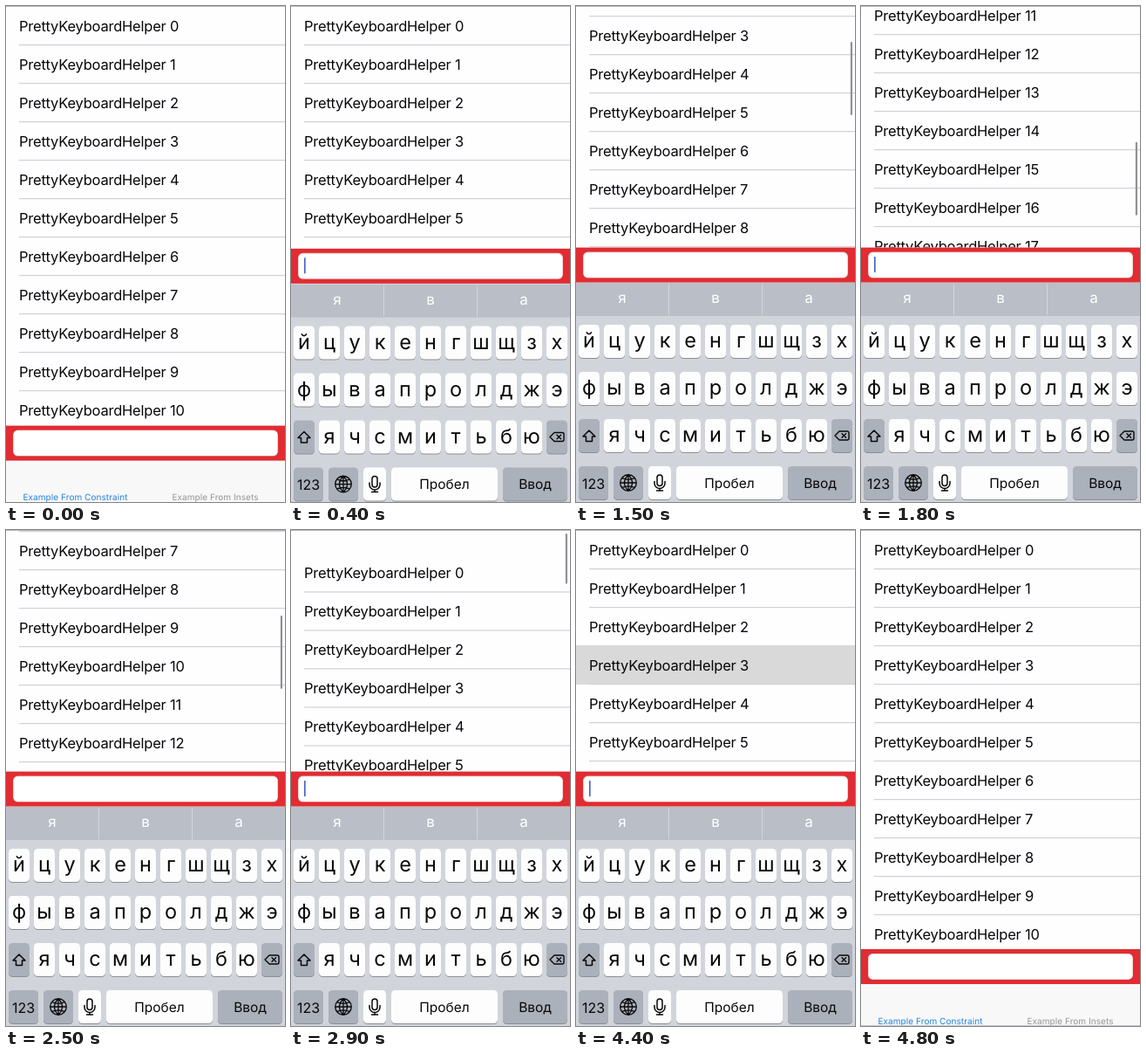
Animation, 320 px wide and 568 px high, one loop 4.9 s. Source, as an HTML page with a canvas:

```html
<!DOCTYPE html>
<html lang="ru">
<head>
<meta charset="utf-8">
<style>
html, body { margin: 0; width: 100%; height: 100%; overflow: hidden; background: #fff; }
canvas { display: block; }
</style>
</head>
<body>
<canvas id="stage" width="320" height="568"></canvas>
<script>
const c = document.getElementById('stage').getContext('2d');
const LOOP = 4900, ROW = 44, ROWS = 20;
const OPEN = 40, CLOSE = 4400;
// Scroll offset: time in ms, position in px
const SCROLL = [[1350, 0], [1550, 180], [1800, 496], [2050, 596], [2220, 585], [2500, 307],
  [2800, 20], [2960, -36], [3150, -16], [3400, -1], [3600, 0]];

const clamp = x => Math.min(1, Math.max(0, x));
const ramp = (t, from, to) => clamp((t - from) / (to - from));

// Critically damped spring from 0 to 1
function spring(ms, k) {
  const x = Math.max(0, ms) / 1000 * k;
  return 1 - (1 + x) * Math.exp(-x);
}

// Smooth curve through the scroll points
function scrollAt(t) {
  const last = SCROLL.length - 1;
  if (t <= SCROLL[0][0] || t >= SCROLL[last][0]) return 0;
  const i = SCROLL.findIndex(p => p[0] > t) - 1;
  const slope = j => j <= 0 || j >= last ? 0 :
    (SCROLL[j + 1][1] - SCROLL[j - 1][1]) / (SCROLL[j + 1][0] - SCROLL[j - 1][0]);
  const [t0, a] = SCROLL[i], [t1, b] = SCROLL[i + 1];
  const d = t1 - t0, u = (t - t0) / d, v = 1 - u;
  return a * v * v * (1 + 2 * u) + b * u * u * (3 - 2 * u) +
    d * u * v * (slope(i) * v - slope(i + 1) * u);
}

function rect(x, y, w, h, color) {
  c.fillStyle = color;
  c.fillRect(x, y, w, h);
}

function round(x, y, w, h, r, color) {
  c.fillStyle = color;
  c.beginPath();
  c.roundRect(x, y, w, h, r);
  c.fill();
}

function text(s, x, y, size, color, align = 'center', spacing = 0) {
  c.font = `${size}px Inter, "Open Sans", sans-serif`;
  c.textRendering = 'geometricPrecision';
  c.letterSpacing = spacing + 'px';
  c.textAlign = align;
  c.fillStyle = color;
  c.fillText(s, x, y);
}

function stroke(path, x, y, width = 1.5) {
  c.save();
  c.translate(x, y);
  c.lineWidth = width;
  c.lineJoin = c.lineCap = 'round';
  c.strokeStyle = '#080808';
  c.stroke(new Path2D(path));
  c.restore();
}

function key(x, y, w, color = '#fdfdfd') {
  round(x, y + 1, w, 38, 4.5, '#8b8e93');
  round(x, y, w, 38, 4.5, color);
}

function drawList(offset, bottom, glow) {
  c.save();
  c.beginPath();
  c.rect(0, 0, 320, bottom);
  c.clip();
  for (let i = 0; i < ROWS; i++) {
    const y = 1 + i * ROW - offset;
    if (y < -ROW || y > bottom) continue;
    if (i === 3 && glow > 0) rect(0, y - 1, 320, ROW + 1, `rgba(217,217,217,${glow})`);
    text('PrettyKeyboardHelper ' + i, 15, y + 28, 16.5, '#080808', 'left', -0.22);
    rect(15, y + 43, 305, 1.2, '#d1d0d6');
  }
  c.restore();
  rect(0, 0, 320, 1, '#b6b6b9');
}

function drawIndicator(offset, alpha) {
  if (alpha <= 0) return;
  const length = 84 + Math.min(0, offset);
  round(314.8, 4 + 0.306 * Math.max(0, offset), 2.2, length, 1.1, `rgba(145,145,149,${alpha})`);
}

function drawTabs() {
  rect(0, 519, 320, 49, '#f8f8f9');
  text('Example From Constraint', 79.5, 566, 10, '#2583dc', 'center', 0.06);
  text('Example From Insets', 240, 566, 10, '#969698', 'center', 0.06);
}

function drawInput(y, cursor) {
  rect(0, y, 320, 40, '#e02c32');
  round(8, y + 5, 304, 30, 5.5, '#eaa9ac');
  round(8.6, y + 5.6, 302.8, 28.8, 5, '#fff');
  if (cursor > 0) rect(15, y + 10.5, 1.7, 18, `rgba(73,103,200,${cursor})`);
}

function drawKeyboard(top) {
  const grey = '#abb1bb', ink = '#080808';
  c.save();
  c.translate(0, top - 317);
  rect(0, 317, 320, 251, '#d1d5db');
  rect(0, 317, 320, 38, '#b9bec7');
  [...'вя'].forEach((_, i) => rect(106 + i * 107, 318, 1, 36, '#d3d7dd'));
  [...'ява'].forEach((s, i) => text(s, 53 + i * 107, 340, 17, '#fff'));
  ['йцукенгшщзх', 'фывапролджэ', 'ячсмитьбю'].forEach((line, r) => {
    const y = 365 + r * 54;
    [...line].forEach((s, i) => {
      const x = 15 + 29 * (i + (r === 2));
      key(x - 12, y, 24);
      text(s, x, y + 26, 23.5, ink);
    });
  });

  key(3, 473, 24, grey);
  stroke('M0-6.5 L7 .5 H3.5 V6 H-3.5 V.5 H-7 Z', 15, 492.5);
  key(293, 473, 24, grey);
  stroke('M-8 0 L-3-5 H6 Q8-5 8-3 V3 Q8 5 6 5 H-3 Z M0-2.3 L4.6 2.3 M4.6-2.3 L0 2.3', 305, 492, 1.4);

  key(3, 527, 34, grey);
  text('123', 20, 552.5, 16, ink);
  key(43, 527, 34, grey);
  stroke('M9.3 0 A9.3 9.3 0 1 1-9.3 0 A9.3 9.3 0 1 1 9.3 0 M-9.3 0 H9.3 M0-9.3 V9.3' +
    'M0-9.3 Q-9 0 0 9.3 Q9 0 0-9.3 M-7-5.4 Q0-2.2 7-5.4 M-7 5.4 Q0 2.2 7 5.4', 60, 546, 1.3);
  key(83, 527, 26);
  stroke('M-3-5.5 A3 3 0 0 1 3-5.5 V1 A3 3 0 0 1-3 1 Z' +
    'M-6-1 V1 A6 6 0 0 0 6 1 V-1 M0 7 V9.5 M-3.5 9.5 H3.5', 96, 545.5);
  key(115, 527, 122);
  text('Пробел', 176, 551.5, 15.5, ink);
  key(243, 527, 74, grey);
  text('Ввод', 280, 551.5, 15.5, ink);
  c.restore();
}

function cursorAt(t) {
  if (t < 150 || t > CLOSE + 40) return 0;
  if (t < 1100) return 1;
  const p = t % 1100;
  return p < 100 ? 1 - ramp(p, 40, 100) : ramp(p, 500, 590);
}

function draw(now) {
  const t = now % LOOP;
  const up = t < CLOSE ? spring(t - OPEN, 20) : 1 - spring(t - CLOSE, 20);
  const offset = scrollAt(t);
  const barY = 480.6 - 204 * up;
  const glow = t >= 4250 ? 1 - ramp(t, 4450, 4750) : 0;

  rect(0, 0, 320, 568, '#fefdff');
  drawList(offset, barY, glow);
  drawIndicator(offset, ramp(t, 1340, 1440) * (1 - ramp(t, 3620, 4000)));
  drawTabs();
  drawInput(barY, cursorAt(t));
  if (up > 0.003) drawKeyboard(568 - 251 * up);
}

let start;
function tick(now) {
  start ??= now;
  draw(now - start);
  requestAnimationFrame(tick);
}
draw(0);
requestAnimationFrame(tick);
</script>
</body>
</html>
```
